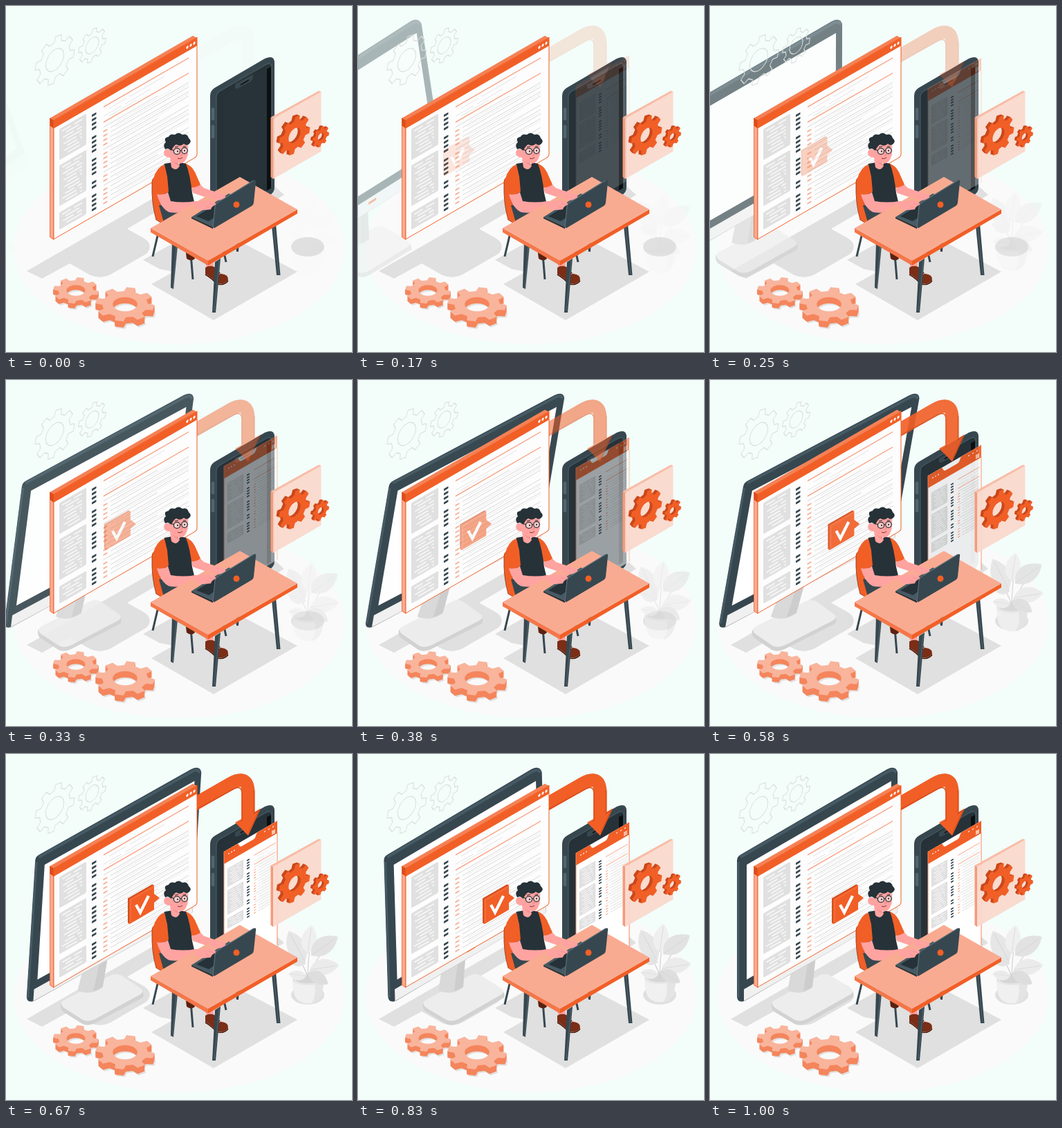
Animation, 500 px wide and 500 px high, one loop 1.04 s. Source, as an HTML page:

```html
<!DOCTYPE html>
<html lang="en">
<head>
<meta charset="utf-8">
<title>App development scene</title>
<style>
html, body { margin: 0; height: 100%; overflow: hidden; background: #f3fdfa; }
svg { display: block; width: 100vw; height: 100vh; }
</style>
</head>
<body>
<svg id="stage" viewBox="0 0 500 500"></svg>
<script>
const ORANGE = '#f15f27', DEEP = '#c9481b', PALE = '#f9ab91', INK = '#263238',
  SLATE = '#37474f', STEEL = '#455a64', SKIN = '#ffa3a1', SHADE = '#e0e0e0';
const WALL = '.866 -.5 0 1', FLOOR = '.866 .5 -.866 .5';
const $ = id => document.getElementById(id);
const range = n => [...Array(n).keys()];
const poly = (points, fill, more = '') => `<polygon points="${points}" fill="${fill}" ${more}/>`;
const path = (d, fill, more = '') => `<path d="${d}" fill="${fill}" ${more}/>`;
const line = (d, stroke, width = 1, more = '') =>
  `<path d="${d}" fill="none" stroke="${stroke}" stroke-width="${width}" ${more}/>`;
const rect = (x, y, w, h, fill, r = 0) =>
  `<rect x="${x}" y="${y}" width="${w}" height="${h}" rx="${r}" fill="${fill}"/>`;
const oval = (x, y, rx, ry, fill, more = '') =>
  `<ellipse cx="${x}" cy="${y}" rx="${rx}" ry="${ry}" fill="${fill}" ${more}/>`;

function gearPath(r, hole, teeth = 8) {
  const corners = [[.77, -.3], [1, -.19], [1, .19], [.77, .3]];
  const points = range(teeth).flatMap(i => corners.map(([f, a]) => {
    const t = (i + a) * 2 * Math.PI / teeth + .2;
    return (r * f * Math.cos(t)).toFixed(2) + ' ' + (r * f * Math.sin(t)).toFixed(2);
  }));
  return `M${points.join('L')}ZM${hole} 0A${hole} ${hole} 0 1 0 ${-hole} 0A${hole} ${hole} 0 1 0 ${hole} 0Z`;
}

// Stacked copies, shifted by (dx, dy) per layer, give the gear its thickness.
function gear(x, y, r, hole, plane, depth, dx, dy, side, top) {
  const d = gearPath(r, hole);
  return range(depth + 1).reverse().map(k => path(d, k ? side : top,
    `fill-rule="evenodd" transform="matrix(${plane} ${x + dx * k} ${y + dy * k})"`)).join('');
}
const outlineGear = (x, y, r, hole) => line(gearPath(r, hole), '#dcdfde', 1.2,
  `stroke-linejoin="round" transform="matrix(${WALL} ${x} ${y})"`);
const floorGear = (x, y, r, hole, depth) =>
  gear(x + 2, y + depth + 2, r, hole, FLOOR, 0, 0, 0, SHADE, SHADE) +
  gear(x, y, r, hole, FLOOR, depth, 0, 1, '#f4855c', '#f9b49c');

function pageContent() {
  let s = '';
  for (const [y, h] of [[17.5, 45], [70, 59], [138, 25]]) {
    s += rect(8, y, 39, h, SHADE, 2);
    for (let r = 0, n = Math.floor((h - 4) / 5); r < n; r++) {
      const x = 12 + r * 5 % 9, split = 17 + r * 7 % 11;
      s += rect(x, y + 4 + r * 5, split - 4, 2, '#f7f7f7', 1) +
        rect(x + split, y + 4 + r * 5, 41 - x - split, 2, '#f7f7f7', 1);
    }
  }
  s += line('M72 22.5H195M72 44.5H195', '#f8a487', 1.7);
  s += line('M80 29H105M110 29H160M72 36H98M103 36H140M80 40H120', '#e8e8e8', 1.2);
  range(22).forEach(i => {
    const y = 25.5 + 6.5 * i, gap = [4, 9, 14, 17].includes(i);
    if (!gap) s += rect(55, y - 1.6, 6.5, 3.2, SLATE, .8);
    if (i < 4) return;
    if (!gap) s += rect(71.5, y - 1, 6, 2, '#f8ab91', .8);
    s += line(`M${gap ? 72 : 82} ${y}H${gap ? 150 : 195}`, '#d8d8d8', 1.1);
    if (i % 3) s += line(`M90 ${y + 3}H${i % 2 ? 195 : 170}`, '#ebebeb', .9);
  });
  return s;
}

const leaf = (x, y, angle, size, fill) =>
  `<g transform="translate(${x} ${y}) rotate(${angle}) scale(${size / 40})">
   ${path('M0 0C8 -15 26 -16 40 0C27 13 10 13 0 0Z', fill)}${line('M0 0H36', '#d6d6d6', .7)}</g>`;

const ground = oval(250, 350, 239, 139, '#fafafa') +
  path('M30 383L216 276V298L175 322L200 336Q214 346 203 358L151 388Q136 395 122 389L92 372L52 394Z', SHADE) +
  poly('198,367 250,338 330,336 421,384 300,454 210,402 242,384 222,380', SHADE) +
  poly('370,262 390,262 402,273 380,286', SHADE) + oval(436, 348, 24, 14, SHADE) +
  floorGear(101, 411, 27, 11, 7) + floorGear(172, 431, 35, 14.5, 9);

const monitor = path('M93 360L158 322Q166 318 174 322L203 340Q209 345 207 352L140 389Q130 394 122 390L94 373Q88 369 89 361Z', '#d2d2d2') +
  path('M93 356L158 320Q166 316 174 320L202 338Q210 343 202 348L140 383Q130 388 122 384L94 367Q86 361 93 356Z', '#ededed') +
  path('M120 300L153 288L148 337Q132 350 112 342Z', '#d9d9d9') + path('M142 296L153 290L148 337L135 343Z', '#cdcdcd') +
  path('M39 154Q39 148 45 145L256 22Q268 16 271 26V228L50 357Q39 360 39 350Z', SLATE) +
  line('M44 149L258 25Q266 21 269 27', STEEL, 4) + line('M41 156V352', STEEL, 3) +
  poly('53,160 262,39 262,206 53,326', '#fff') + poly('49,340 271,212 271,229 49,357', '#f0f0f0') +
  line('M49 357L271 229V212', '#d8d8d8', .8) + poly('155,284 167,277 167,280 155,287', ORANGE);

const phone = path('M295 130Q295 122 302 118L374 76Q388 70 388 82V262Q388 270 380 274L300 320Q295 318 295 310Z', SLATE) +
  path('M304 132Q304 126 309 123L375 85Q384 80 384 89V262L304 312Z', INK) +
  line('M304 312V132Q304 126 309 123L375 85Q384 80 384 89V262', STEEL, 1.2) +
  poly('377,91 383,88 383,263 377,267', '#0b0f11') +
  path('M331 113V118Q333 121 337 118L352 110Q357 107 357 102V99Z', SLATE) + line('M339 114L351 107', '#111', 1.5) +
  line('M299 149V163M299 174V189', '#52656e', 4.5, 'stroke-linecap="round"');

const appScreen = `<g transform="matrix(1 -.577 0 1 315 141)">
  ${rect(0, 0, 77, 180, '#fff')}
  <g clip-path="url(#phoneClip)"><use href="#page" transform="translate(0 17) scale(.6)"/></g>
  ${path('M0 1Q0 0 2 0H19Q21 0 22 4Q23 7 26 7H42Q45 7 46 4Q47 0 49 0H77V18H0Z', ORANGE)}
  ${line('M6 7H8M10 7H12M14 7H16M58 5H60M64 5H66M70 5H72M69 11H74M69 13H74M69 15H74', '#fff', 1.2)}
  ${line('M0 180V0M77 18V180', '#f58a61', 1)}</g>`;

const arrow = line('M270 74L324 43Q350 28 350 56V94', ORANGE, 19) + poly('331,99 368,79 350,118', ORANGE) +
  line('M270 83L329 50.5Q341 44 341 58V97', '#da4d1a', 1.5) + line('M358.5 52V86L366 81L351 114', '#da4d1a', 1.6);

const browser = poly('63.5,162 69,165 69,337.5 63.5,334', PALE, `stroke="${ORANGE}" stroke-width=".8"`) +
  poly('63.5,162 270,43 276,46 69,165', '#f58155') + poly('63.5,162 69,165 69,177 63.5,173', '#d94e1c') +
  `<g transform="matrix(1 -.577 0 1 69 165)">
  ${path('M0 0H207V169Q207 172 203 172H0Z', '#fdfdfd', `stroke="${ORANGE}"`)}
  <g id="page">${pageContent()}</g>${rect(0, 0, 207, 12, ORANGE)}
  ${[193, 198, 203].map(x => oval(x, 6, 1.6, 2, '#fff')).join('')}</g>`;

const bubble = path('M176.5 209L211 189Q214 188 214 191V202L222 208L214 215V225L180 245Q176.5 247 176.5 243Z', ORANGE) +
  line('M177 244V209L212 189', '#d04b1c', 1.8) + line('M180 243V211L213 192', '#f58155', .8) +
  line('M188 218L194 229L206 205', '#fff', 4.2);

const panel = poly('386,163 455.5,124 455.5,210 386,250', '#fbd8cb', 'fill-opacity=".9"') +
  poly('382.5,161 386,163 386,250 382.5,247', '#f69a78') + poly('382.5,161 452,122.5 455.5,124 386,163', '#f9bca7') +
  gear(417, 187, 26, 10, WALL, 4, -1, -.4, DEEP, ORANGE) + gear(455, 189, 14, 5, WALL, 3, -1, -.4, DEEP, ORANGE);

const person = line('M220 328L212 362M267 358L270 395M314 352L318 370', SLATE, 3) +
  path('M211 256Q211 249 215 248L224 290L229 316L217 309Q210 285 211 256Z', ORANGE, 'stroke="#8f3212" stroke-width=".8"') +
  path('M221 288L272 282L282 306L230 320Z', SLATE) +
  path('M266 256L279 256L286 263L307 270Q316 272 319 277L313 281Q300 280 287 276L270 270Z', SKIN) +
  path('M258 227Q268 230 273 240L281 258Q275 263 266 262L254 240Z', ORANGE) +
  path('M229 228L240 226Q246 238 252 226L260 228Q266 243 269 270L272 283Q252 296 232 293L223 250Z', INK) +
  path('M229 229Q218 233 213 249Q209 262 218 273Q227 275 235 268L233 246Z', ORANGE) +
  path('M218 272Q228 274 234 269L238 282Q256 285 274 282L293 282Q302 283 304 288L294 294L276 293Q250 301 236 298Q224 293 218 272Z', SKIN) +
  path('M237 198L262 197Q265 213 260 222Q256 229 249 227L251 231Q246 240 239 233L237 219Q228 219 228 211Q230 205 237 208Z', SKIN) +
  path('M240 222Q244 227 249 227L250 230Q244 229 240 222Z', '#f28f8f') +
  path('M230 207Q226 200 231 197Q227 190 235 189Q237 184 244 186Q249 181 255 186Q262 184 264 191Q269 195 265 199Q261 203 257 199Q252 204 246 200Q242 202 239 209L234 206Z', INK) +
  oval(247, 210, 4.6, 4.3, '#ffd0cd', `stroke="${INK}" stroke-width="1.2"`) +
  oval(258, 209, 4.2, 4.3, '#ffd0cd', `stroke="${INK}" stroke-width="1.2"`) +
  oval(248, 210, 1, 1.3, INK) + oval(258, 209, 1, 1.3, INK) +
  line('M238 207L243 209M251.5 209H254M244 204L249 203M256 203L260 203', INK, 1.2) +
  line('M253 210L255 215L252 216', '#e27b7b', .8) + line('M248 220Q251 222 255 219', '#8d2f3a', 1);

const shoes = path('M260 357Q262 352 270 357L273 365Q268 370 261 365Z', '#5b2110') +
  poly('286,366 299,362 300,380 291,381', SKIN) +
  path('M288 378Q294 374 301 377L311 387Q322 388 321 396Q316 403 305 401Q296 391 288 387Z', '#7b2d16') +
  line('M288 388Q297 393 305 402Q316 404 321 397', '#4a190b', 1.5) + line('M302 385L308 382M305 389L311 386', '#f5c7b5', 1);

const desk = poly('331,340 337,340 336,355 333,355', SLATE) + poly('240,342 248,346 242,409 238,407', SLATE) +
  poly('384,318 390,315 396.5,389 391,389', SLATE) +
  poly('209,321 292,368 292,375 209,327', '#f4774a') + poly('292,368 421,294 421,300 292,375', ORANGE) +
  poly('209,321 338,247 421,294 292,368', PALE) + poly('302,370 310,365 303,443 298,443', SLATE) +
  line('M246 348L241 407M308 368L301 441M387 320L394 388', '#52656e', 1);

const laptopBase = poly('268,305 322,271 352,284 299,319', STEEL) + poly('268,305 299,319 299,322 268,307', INK) +
  poly('275,304 319,277 334,284 293,311', INK);
const hands = path('M268 283L293 281Q302 282 304 287Q297 289 296 294L284 295L276 293Z', SKIN) +
  path('M296 268L311 271Q318 273 318 278L307 281L294 277Z', SKIN) +
  line('M293 285L303 288M289 289L296 293', '#f28f8f', .8);
const lid = path('M299 320L302 290Q303 286 306 284L358 252Q362 250 361 255L358 284Q358 287 355 289L301 321Z', SLATE) +
  line('M299 320L302 290Q303 286 306 284L358 252', '#5a6e78', 1.2) + oval(333, 287, 4.5, 4.5, ORANGE);

const plant = path('M414 327Q414 352 425 358Q437 364 449 357Q459 350 459 326Z', '#f0f0f0') +
  path('M446 333Q449 350 441 361Q459 357 459 327Z', '#e4e4e4') + oval(436.5, 326, 22.5, 8, '#e6e6e6') +
  oval(436.5, 326, 18, 5.5, '#d6d6d6') +
  line('M436 327Q436 300 440 275M436 320Q448 300 460 280M436 322Q428 300 420 292', '#d2d2d2', 1.2) +
  [[432, 300, -118, 50, '#e6e6e6'], [436, 288, -82, 41, '#efefef'], [441, 291, -35, 47, '#e2e2e2'],
   [439, 312, -9, 43, '#ebebeb'], [437, 316, 30, 33, '#dedede'], [433, 303, 201, 28, '#e4e4e4'],
   [434, 321, 188, 26, '#ebebeb']].map(a => leaf(...a)).join('');

$('stage').innerHTML = `<clipPath id="phoneClip"><rect width="75" height="180"/></clipPath>
  ${ground}<g id="monitor">${monitor}</g>${outlineGear(70.5, 78, 33, 15)}${outlineGear(124.5, 57, 23, 11)}
  ${phone}<g id="app">${appScreen}</g><g id="arrow">${arrow}</g>${browser}<g id="bubble">${bubble}</g>
  ${panel}<g id="plant">${plant}</g>${person}${shoes}${desk}${laptopBase}${hands}${lid}`;

// cubic-bezier(.36, -.01, .5, 1.38), solved by bisection
function ease(x) {
  const curve = (u, a, b) => 3 * u * (1 - u) ** 2 * a + 3 * u * u * (1 - u) * b + u ** 3;
  let lo = 0, hi = 1;
  for (let i = 0; i < 30; i++) {
    const mid = (lo + hi) / 2;
    if (curve(mid, .36, .5) < x) lo = mid; else hi = mid;
  }
  return curve(hi, -.01, 1.38);
}
const tan = degrees => Math.tan(degrees * Math.PI / 180);
const mix = (a, b, q) => a + (b - a) * q;

function show(id, transform, opacity) {
  $(id).setAttribute('transform', transform);
  $(id).setAttribute('opacity', Math.min(1, Math.max(0, opacity)));
}

function moveMonitor(p) {
  const first = p < .6, q = ease(first ? p / .6 : p < .8 ? (p - .6) / .2 : (p - .8) / .2);
  const skew = first ? mix(tan(20), tan(-10), q) : p < .8 ? mix(tan(-10), tan(2), q) : mix(tan(2), 0, q);
  const x = first ? mix(-250, 0, q) : 0;
  show('monitor', `matrix(1 0 ${skew} 1 ${x - 205 * skew} 0)`, first ? q : 1);
}

function draw() {
  // 25 poses per loop, at 24 a second
  const step = Math.min(24, Math.floor((performance.now() % 1040 + 4) * .024));
  const p = (step + 1) / 25, q = ease(p), rest = 1 - q;
  moveMonitor(p);
  show('app', `translate(0 ${-30 * rest})`, q);
  show('arrow', '', q);
  show('bubble', `translate(${-62 * rest} 0)`, q);
  show('plant', `translate(0 ${30 * rest})`, q);
  requestAnimationFrame(draw);
}
draw();
</script>
</body>
</html>
```
